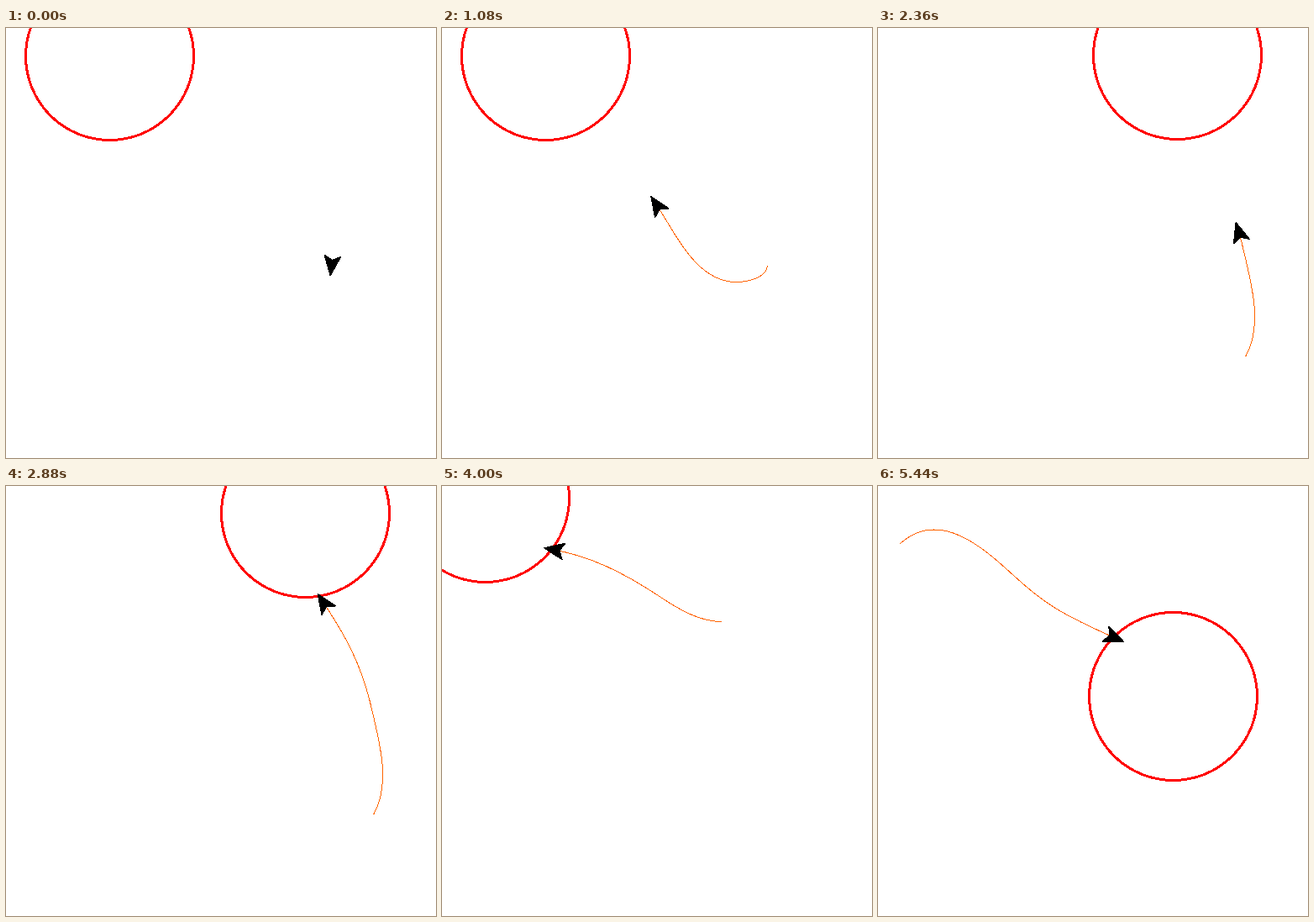
An HTML page for the animation above (5.48 s loop, 512 by 512 pixels).

```html
<!DOCTYPE html>
<html lang="en">
<head>
<meta charset="utf-8">
<title>Seeking arrow</title>
<style>
  html, body { margin: 0; width: 100%; height: 100%; overflow: hidden; background: #fff; }
  svg { display: block; width: 512px; height: 512px; }
</style>
</head>
<body>
<svg viewBox="0 0 512 512" shape-rendering="crispEdges">
  <g transform="translate(.5 .5)">
    <path id="trail" fill="none" stroke="#ff6400"/>
    <circle id="goal" r="100" fill="none" stroke="#f00" stroke-width="3"/>
    <polygon id="arrow" points="11,0 -12,-9.6 -7,0 -12,9.6" stroke="#000" stroke-width="1.5" stroke-linejoin="round"/>
  </g>
</svg>
<script>
const STEP = 40;

// Each run crosses its path in a number of steps; rampUp is the time to reach full speed
const runs = [
  { steps: 42, rampUp: 12.4, goal: [123, 33],
    path: "M387 283 C386 296 365 302 350 302 C312 302 288 265 268 231 C246 194 222 160 170.7 119.3" },
  { steps: 32, rampUp: 0, goal: [356, 32],
    path: "M437 391 C459 353 443 300 434 261 C421 206 400 172 372 130" },
  { steps: 28, rampUp: 0, goal: [51, 14],
    path: "M332 161 C307 161 282 147 257 130 C213 101 172 81 124 74" },
  { steps: 35, rampUp: 0, goal: [351, 250],
    path: "M26 68 C73 26 125 73 162 107 C196 138 215 151 281.7 180.4" }
];
const total = runs.reduce((sum, run) => sum + run.steps, 0);

const [trail, goal, arrow] = ["trail", "goal", "arrow"].map(id => document.getElementById(id));

// Distance covered at full speed 1
const covered = (t, ramp) => t < ramp ? t * t / (2 * ramp) : t - ramp / 2;

function draw(step) {
  let index = 0;
  while (step >= runs[index].steps) step -= runs[index++].steps;
  const { steps, rampUp, goal: [cx, cy], path } = runs[index];

  trail.setAttribute("d", path);
  const length = trail.getTotalLength();
  const dist = length * covered(step, rampUp) / covered(steps - 1, rampUp);
  trail.setAttribute("stroke-dasharray", `${dist} ${length + 1}`);

  goal.setAttribute("cx", cx);
  goal.setAttribute("cy", cy);

  const { x, y } = trail.getPointAtLength(dist);
  const back = trail.getPointAtLength(Math.max(dist - 1, 0));
  const ahead = trail.getPointAtLength(Math.min(dist + 1, length));
  const angle = Math.atan2(ahead.y - back.y, ahead.x - back.x) * 180 / Math.PI;
  arrow.setAttribute("transform", `translate(${x} ${y}) rotate(${angle})`);
}

const start = performance.now();
let shown = -1;
function tick() {
  const elapsed = Math.max(0, performance.now() - start);
  const step = Math.floor(elapsed / STEP) % total;
  if (step !== shown) draw(shown = step);
  requestAnimationFrame(tick);
}
tick();
</script>
</body>
</html>
```
